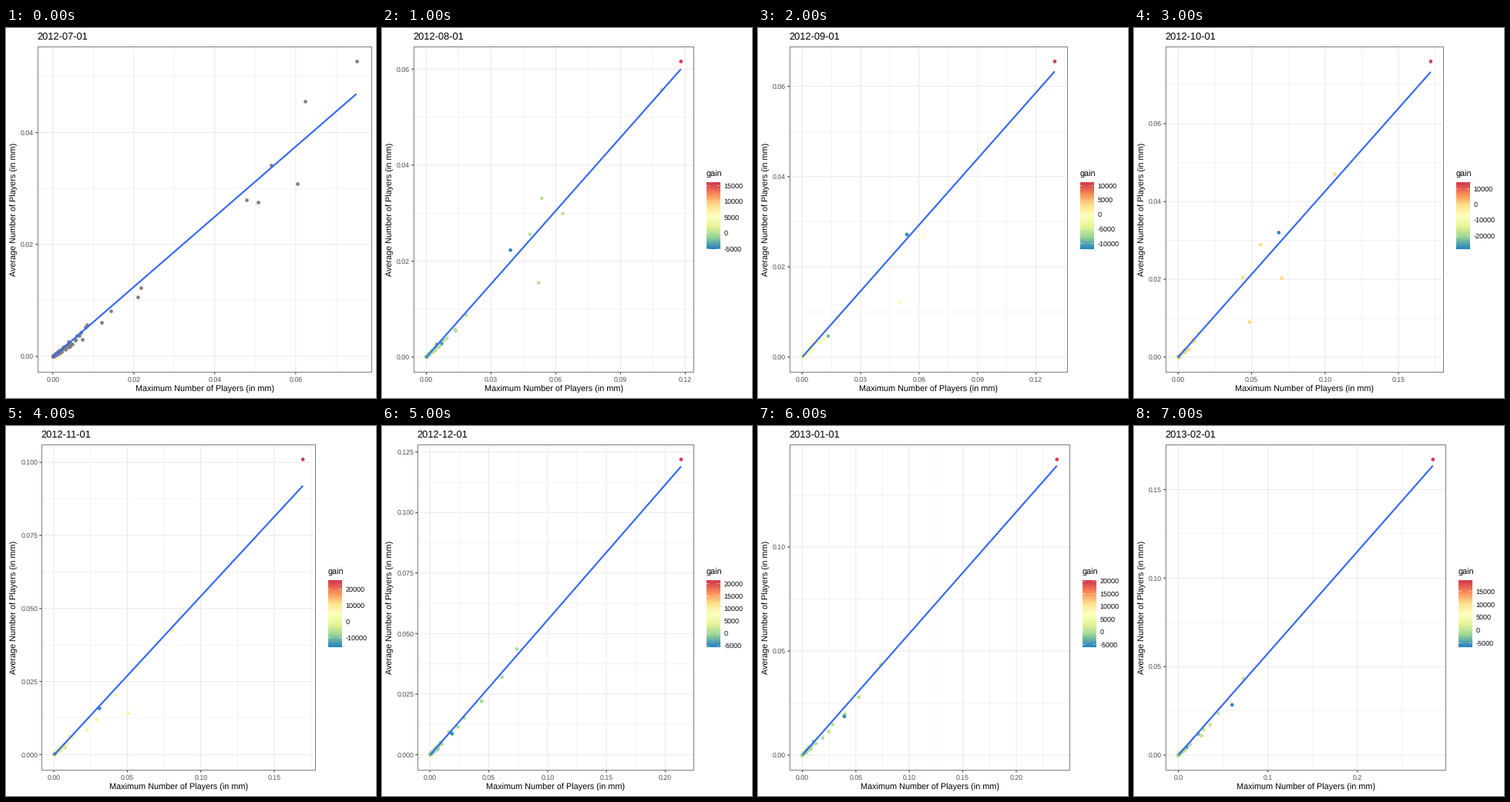
Write a matplotlib script that moves like this. It is 480 by 480 pixels and loops after 8000 ms.

```python
from collections import namedtuple
import numpy as np
import matplotlib.pyplot as plt
from matplotlib.animation import FuncAnimation
from matplotlib.colors import LinearSegmentedColormap

PX = 0.9  # points per pixel at 80 dpi
TOP, BOTTOM = 24.2, 446.2
BAR_TOP, BAR_BOTTOM = 200.5, 286.8

plt.rcParams["font.family"] = "Liberation Sans"
plt.rcParams["text.hinting"] = "none"

spectral = LinearSegmentedColormap.from_list("spectral", [
    "#3288BD", "#99D594", "#E6F598", "#FFFFBF", "#FEE08B", "#FC8D59", "#D53E4F"])

# The leading game, the fitted line from (0, base) to (peak, fit), break steps, gains.
Month = namedtuple("Month", "peak mean base fit x_step y_step low high")
MONTHS = [
    Month(.0750, .0527, -.00014, .0469, .02, .02, 0, 0),
    Month(.1180, .0616, 0, .0600, .03, .02, -5050, 16000),
    Month(.1296, .0655, 0, .0633, .03, .02, -12000, 11000),
    Month(.1720, .0760, 0, .0733, .05, .02, -28700, 14200),
    Month(.1695, .1010, -.0002, .0920, .05, .025, -16000, 25500),
    Month(.2135, .1219, -.0002, .1190, .05, .025, -5500, 21200),
    Month(.2380, .1420, 0, .1390, .05, .05, -6000, 20200),
    Month(.2842, .1670, 0, .1635, .1, .05, -6500, 19200),
]

# Rivals' maxima and averages in thousands at a few months, linear in between.
# The last rival is always the one that loses the most.
KEYS = [0, 1, 3, 4, 5, 7]
RIVALS = [
    ([62.3, 109, 106.6, 81, 74, 72.5], [45.6, 55.7, 47, 42.5, 43.6, 43.2]),
    ([54, 63.2, 56, 57, 61.2, 44.3], [34.2, 29.9, 28.9, 29.9, 32, 23.6]),
    ([60.4, 53.5, 70.5, 50.5, 44, 35.5], [30.8, 33.1, 20.3, 14.2, 22, 17.3]),
    ([47.9, 48, 44, 42.2, 28.9, 28.2], [28, 25.6, 20.4, 20.4, 15.2, 14.3]),
    ([50.7, 52, 48.6, 29, 23.7, 25.8], [27.5, 15.5, 9, 11.9, 11.5, 11]),
    ([21.8, 39, 68.5, 31, 18.5, 60], [12.2, 22.3, 32, 15.8, 8.8, 28.4]),
]
CROWD = 200

fig = plt.figure(figsize=(6, 6), dpi=80, facecolor="white")
ax = fig.add_axes([0, 0, 1, 1])


def label(x, y, text, size, color="black", **kw):
    ax.text(x, y, text, fontsize=size * PX, color=color, va="baseline", **kw)


def line(xs, ys, color, width, z, snap=False):
    ax.plot(xs, ys, color=color, lw=width * PX, zorder=z, snap=snap,
            solid_capstyle="butt")


def scale(low, high, start, end):
    """Map low..high onto start..end with a margin of 5% of the range."""
    pad = (end - start) / 22
    return lambda v: start + pad + (v - low) / (high - low) * (end - start - 2 * pad)


def decimals(step):
    return len(f"{step:g}") - 2


def breaks(step, to_px, start, end):
    """Yield (pixel, text) for each break, with no text at the minor ones."""
    for k in range(-1, 14):
        value = step * k / 2
        if start < to_px(value) < end:
            yield to_px(value), "" if k % 2 else f"{value:.{decimals(step)}f}"


def legend_values(m):
    step = 10000 if m.high - m.low > 30000 else 5000
    return range(-(-m.low // step) * step, m.high + 1, step)


def panel_edges(m):
    left = 46 if decimals(m.y_step) == 3 else 41
    if not m.high:
        return left, 474.3
    widest = max(len(str(v)) for v in legend_values(m))
    return left, 404.3 if widest < 6 else 401.3


def draw_axes(m, left, right, to_x, to_y):
    for x, text in breaks(m.x_step, to_x, left, right):
        line([x, x], [TOP, BOTTOM], "#EBEBEB", 1.07 if text else .55, 1)
        if text:
            line([x, x], [BOTTOM, BOTTOM + 3], "#333333", 1.07, 4)
            label(x, 459, text, 8.8, "#4D4D4D", ha="center")
    for y, text in breaks(m.y_step, to_y, TOP, BOTTOM):
        line([left, right], [y, y], "#EBEBEB", 1.07 if text else .55, 1)
        if text:
            line([left - 2.7, left], [y, y], "#333333", 1.07, 4)
            label(left - 4.9, y + 3.2, text, 8.8, "#4D4D4D", ha="right")
    line([left, right, right, left, left], [TOP, TOP, BOTTOM, BOTTOM, TOP],
         "#7F7F7F", 1, 5, snap=True)
    label((left + right) / 2, 472, "Maximum Number of Players (in mm)", 10.85,
          ha="center")
    label(13.3, 235, "Average Number of Players (in mm)", 10.85, ha="center",
          rotation=90, rotation_mode="anchor")


def games(i, m):
    """Return x, y and gain of the crowd, the rivals and the leader."""
    rng = np.random.RandomState(20 + i)
    rank = np.arange(1, CROWD + 1)
    x = .03 / (rank + 1) ** .7 * np.exp(rng.normal(0, .15, CROWD))
    x *= rng.uniform(.05, 1, CROWD) ** (rank > 25)
    y = x * m.fit / m.peak * rng.uniform(.62, 1.1, CROWD)
    gain = m.low * rng.rand(CROWD) ** 6 + rng.normal(0, 250, CROWD)
    rivals = [[np.interp(i, KEYS, track) / 1000 for track in pair] for pair in RIVALS]
    rival_x, rival_y = zip(*rivals)
    rival_gain = [0] * (len(RIVALS) - 1) + [m.low]
    return (np.r_[x, rival_x, m.peak], np.r_[y, rival_y, m.mean],
            np.r_[gain, rival_gain, m.high])


def draw_games(i, m, to_x, to_y):
    x, y, gain = games(i, m)
    color = spectral((gain - m.low) / (m.high - m.low)) if m.high else "#7F7F7F"
    ax.scatter(to_x(x), to_y(y), s=(4.7 * PX) ** 2, c=color, lw=0, zorder=2)
    line(to_x(np.array([0, m.peak])), to_y(np.array([m.base, m.fit])),
         "#3366FF", 2.13, 3)


def draw_legend(m, x):
    ax.imshow(np.linspace(1, 0, 20)[:, None], cmap=spectral, aspect="auto",
              interpolation="bilinear", extent=(x, x + 17.3, BAR_BOTTOM, BAR_TOP))
    label(x - .2, 193, "gain", 10.85)
    for value in legend_values(m):
        y = BAR_TOP + (m.high - value) / (m.high - m.low) * (BAR_BOTTOM - BAR_TOP)
        for tick in (x, x + 13.8):
            line([tick, tick + 3.5], [y, y], "white", .5, 4)
        label(x + 22.7, y + 3.2, str(value), 9)


def draw(i):
    m = MONTHS[i]
    left, right = panel_edges(m)
    to_x = scale(0, m.peak, left, right)
    to_y = scale(m.base, m.mean, BOTTOM, TOP)
    ax.clear()
    draw_axes(m, left, right, to_x, to_y)
    draw_games(i, m, to_x, to_y)
    year, month = divmod(6 + i, 12)
    label(left - .3, 15, f"{2012 + year}-{month + 1:02d}-01", 12.9)
    if m.high:
        draw_legend(m, right + 16.7)
    ax.set(xlim=(0, 480), ylim=(480, 0))
    ax.axis("off")
    return []


anim = FuncAnimation(fig, draw, frames=len(MONTHS), interval=1000,
                     repeat=True, repeat_delay=0, blit=False)
plt.show()
```
